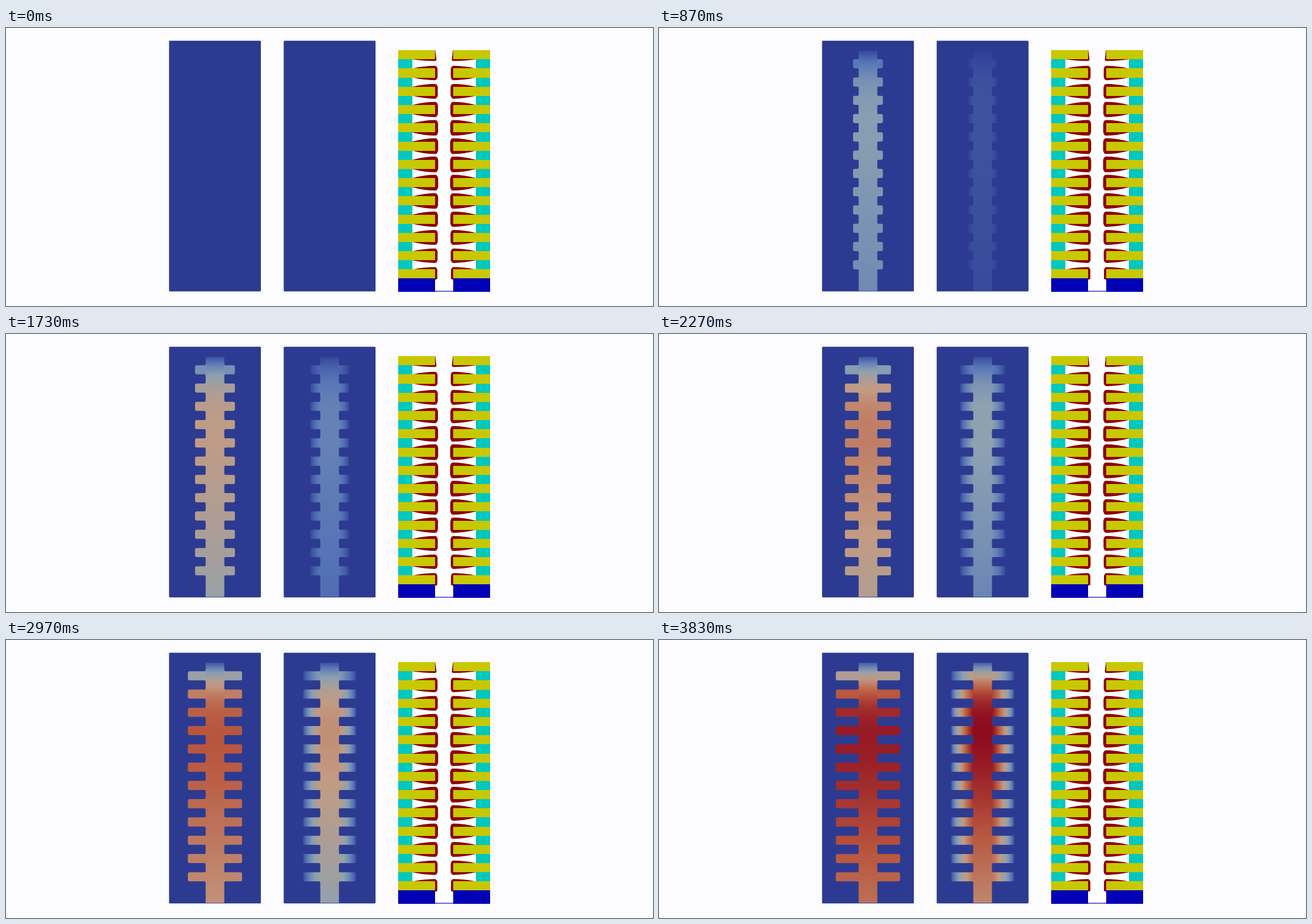
Recreate the animation shown at these times as an HTML page. Size 1140x491 px, loop 3860 ms.

```html
<!DOCTYPE html>
<html lang="en">
<head>
<meta charset="utf-8">
<title>Etch simulation</title>
<style>
html, body { margin: 0; width: 100%; height: 100%; overflow: hidden; background: #fcfcfe; }
svg { display: block; width: 100%; height: 100%; }
</style>
</head>
<body>
<svg id="stage" viewBox="0 0 1140 491"></svg>
<script>
const LOOP = 3860, LAST = 115;
const FINS = 12, PITCH = 32.27, FIN_H = 16.1, FIN_Y = 55.2;
const TOP = 40, BOTTOM = 464.3, HALF = 16.4;
const BASE = '#2c3b91';
const svg = document.getElementById('stage');

// Evenly spaced colours from low to high
const SCALE = ['#2c3b91', '#5573b7', '#8ca1b1', '#c39b82', '#b9573f', '#880019']
  .map(hex => [1, 3, 5].map(i => parseInt(hex.slice(i, i + 2), 16)));

function colour(v) {
  const x = Math.min(1, Math.max(0, v)) * (SCALE.length - 1);
  const i = Math.min(SCALE.length - 2, Math.floor(x));
  return `rgb(${SCALE[i].map((c, j) => Math.round(c + (SCALE[i + 1][j] - c) * (x - i)))})`;
}

// Quick rise below the opening, then an even decline with depth
const profile = (from, to) => y => {
  const k = (y - TOP) / (BOTTOM - TOP);
  return (from + (to - from) * k) * (1 - Math.exp(-(y - TOP + 4) / 40));
};

function add(parent, tag, attrs) {
  const el = document.createElementNS('http://www.w3.org/2000/svg', tag);
  for (const k in attrs) el.setAttribute(k, attrs[k]);
  return parent.appendChild(el);
}
const rect = (parent, x, y, width, height, fill, rx = 0) =>
  add(parent, 'rect', { x, y, width, height, fill, rx });

function gradient(id, x1, y1, x2, y2, count) {
  const el = add(svg, 'linearGradient', {
    id, x1, y1, x2, y2, gradientUnits: 'userSpaceOnUse', spreadMethod: 'reflect'
  });
  return { el, stops: Array.from({ length: count }, (_, i) =>
    add(el, 'stop', { offset: i / (count - 1) })) };
}

// Fin across the channel, with filleted roots and rounded ends
function finPath(c, y, len) {
  const r = Math.min(3, len / 2), f = Math.min(2, len / 2), b = y + FIN_H;
  const side = s => {
    const root = c + s * HALF, end = root + s * len;
    return `M${root} ${y - f}Q${root} ${y} ${root + s * f} ${y}H${end - s * r}` +
      `Q${end} ${y} ${end} ${y + r}V${b - r}Q${end} ${b} ${end - s * r} ${b}` +
      `H${root + s * f}Q${root} ${b} ${root} ${b + f}H${c}V${y - f}Z`;
  };
  return side(-1) + side(1);
}

function panel(id, c, depth, spread) {
  rect(svg, c - 80.9, 22.5, 161.8, 442.7, BASE, 1.5);
  const fins = Array.from({ length: FINS }, (_, i) => {
    const y = FIN_Y + i * PITCH, gid = `${id}${i}`;
    return {
      y, value: depth(y + FIN_H / 2),
      grad: spread && gradient(gid, c, 0, c + HALF, 0, 11),
      el: add(svg, 'path', { fill: `url(#${gid})` })
    };
  });
  const column = gradient(id, 0, TOP, 0, BOTTOM, 50);
  rect(svg, c - HALF, TOP, HALF * 2, BOTTOM - TOP, `url(#${id})`);

  return (amp, len) => {
    column.stops.forEach((s, i, all) => {
      const y = TOP + (BOTTOM - TOP) * i / (all.length - 1);
      s.setAttribute('stop-color', colour(amp * depth(y)));
    });
    for (const fin of fins) {
      const v = amp * fin.value;
      fin.el.setAttribute('d', finPath(c, fin.y, len));
      if (!spread) {
        fin.el.setAttribute('fill', colour(v));
        continue;
      }
      fin.grad.el.setAttribute('x2', c + HALF + len);
      fin.grad.stops.forEach((s, i, all) => {
        const u = i / (all.length - 1);
        s.setAttribute('offset', (HALF + len * u) / (HALF + len));
        s.setAttribute('stop-color', colour(v * (1 - u ** 1.2) ** .7));
      });
    }
  };
}

function layerStack() {
  const YELLOW = '#c8c800', CYAN = '#00c8be', RED = '#8c0000', BLUE = '#0000b4';
  const left = 691.3, root = 716, end = 756, top = 39.2, h = 16.1;
  const bar = (...args) => rect(...args).setAttribute('shape-rendering', 'crispEdges');
  bar(svg, 715, 55, 114, 409, '#fff');
  for (const flip of ['', 'translate(1544 0) scale(-1 1)']) {
    const g = add(svg, 'g', { transform: flip });
    for (let i = 0; i <= FINS; i++) {
      const y = top + i * PITCH, b = y + h;
      const bulge = Math.sin(Math.PI * i / FINS);
      const o = 4.2 + 1.7 * bulge, tip = 760 + 1.5 * bulge, bend = tip - 5;
      const upper = `M${root} ${y}Q738 ${y - o} ${bend} ${y - o}Q${tip - 1} ${y - o} ${tip} ${y + 1}`;
      const lower = `V${b - 1}Q${tip - 1} ${b + o} ${bend} ${b + o}Q738 ${b + o} ${root} ${b}Z`;
      let d = upper + lower;
      if (i === 0) d = `M755 ${y}H756.5L758.5 ${b + 1}Q758 ${b + 3} 754 ${b + 3}Q736 ${b + 3} ${root} ${b}Z`;
      if (i === FINS) d = upper + `V${b + .5}L757 ${b + 2}H${root}Z`;
      add(g, 'path', { d, fill: RED });
      if (i < FINS) bar(g, left, b, root - left, PITCH - h, CYAN);
      bar(g, left, y, end - left, h, YELLOW);
    }
    bar(g, left, 442.4, end - left, 23.4, BLUE);
  }
  rect(svg, 755, 464.3, 34, 1.2, BLUE);
}

const drawA = panel('a', 368.2, profile(1.08, .73), false);
const drawB = panel('b', 570.2, profile(1.16, .66), true);
layerStack();

let shown = -1;
function render(now) {
  const t = now % LOOP, r = t % 100;
  // 30 steps per second, held for 30, 40 and 30 ms
  const step = Math.min(LAST, 3 * Math.floor(t / 100) + (r >= 30) + (r >= 70));
  if (step === shown) return;
  shown = step;
  const k = step / LAST, len = 1 + 39.2 * k;
  drawA(k ** .6, len);
  drawB(k ** 1.65, len);
}
const start = performance.now();
function tick() {
  render(performance.now() - start);
  requestAnimationFrame(tick);
}
tick();
</script>
</body>
</html>
```
